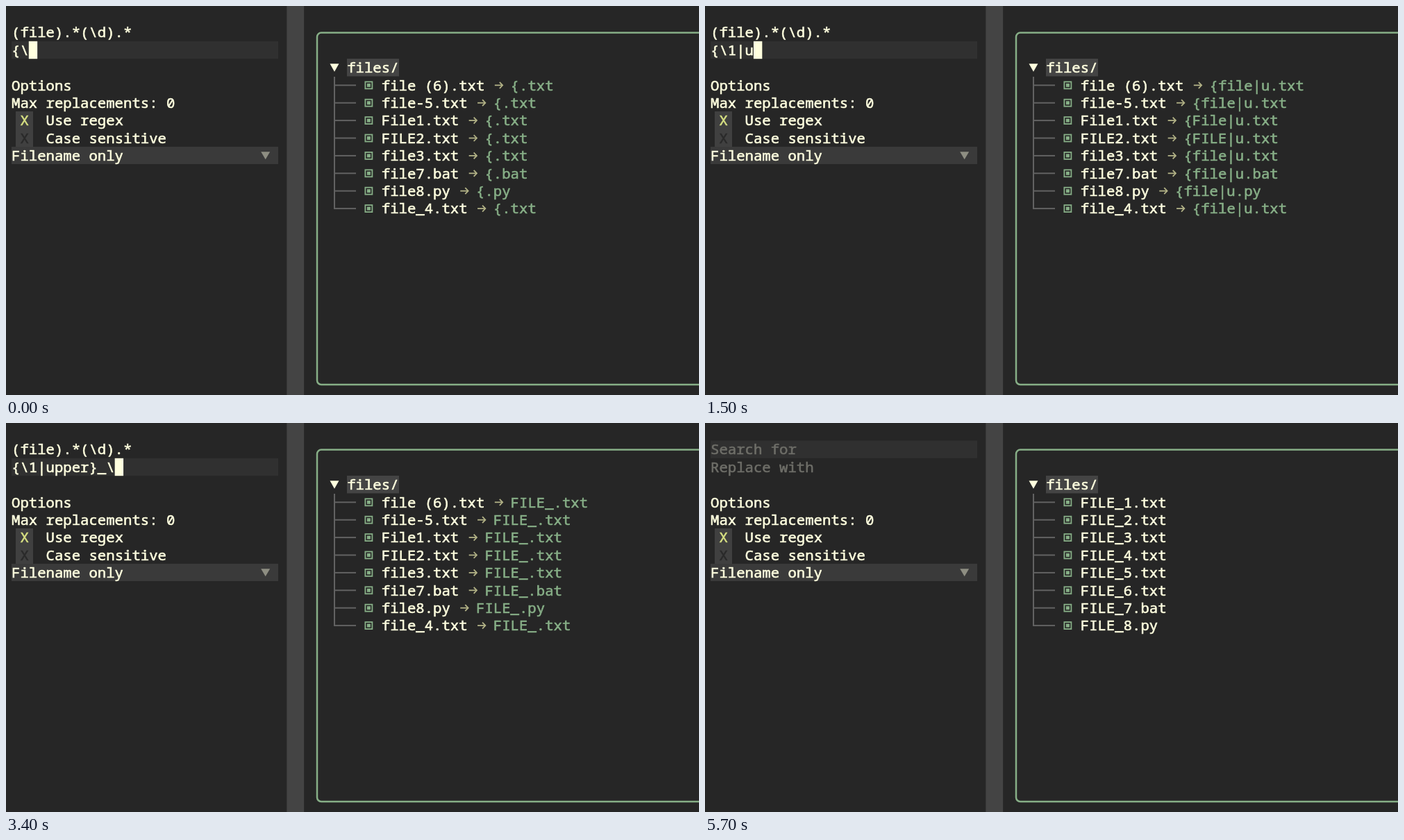
Animation, 998 px wide and 561 px high, one loop 5900 ms. Source, as an HTML page with a canvas:

```html
<!DOCTYPE html>
<html lang="en">
<head>
<meta charset="utf-8">
<title>Batch rename</title>
<style>
  html, body { margin: 0; width: 100%; height: 100%; overflow: hidden; background: #262626; }
  canvas { display: block; }
</style>
</head>
<body>
<canvas id="stage" width="998" height="561"></canvas>
<script>
const ctx = document.getElementById('stage').getContext('2d');
const LOOP = 5900, CELL = 12.39, ROW = 25.4, LEFT = 8;
const BG = '#262626', CREAM = '#ffffdf', GREEN = '#87af87', GRAY = '#444444',
      DIM = '#6e6e68', LINE = '#626262', ARROW = '#b2b286';

const files = ['file (6).txt', 'file-5.txt', 'File1.txt', 'FILE2.txt',
               'file3.txt', 'file7.bat', 'file8.py', 'file_4.txt'];
const template = '{\\1|upper}_\\2';
// [time, characters typed]
const keys = [[0, 2], [100, 3], [700, 4], [1500, 5], [1600, 7], [1700, 8], [1800, 9],
              [3400, 12], [4100, 13]];

const colX = c => LEFT + c * CELL;
const rowY = r => ROW * (r + 0.5);

function box(x, y, w, h, color) {
  ctx.fillStyle = color;
  ctx.fillRect(x, y, w, h);
}

// A thin outline gives the letters their medium weight.
function text(s, col, row, color = CREAM) {
  const x = colX(col), y = Math.round(rowY(row) + 7.3);
  ctx.fillStyle = ctx.strokeStyle = color;
  ctx.lineWidth = 0.6;
  ctx.fillText(s, x, y);
  ctx.strokeText(s, x, y);
}

function stroke(points, color, width = 2) {
  ctx.strokeStyle = color;
  ctx.lineWidth = width;
  ctx.beginPath();
  for (const [x, y] of points) ctx.lineTo(x, y);
  ctx.stroke();
}

function triangle(x, y, w, h, color) {
  ctx.fillStyle = color;
  ctx.beginPath();
  ctx.moveTo(x - w / 2, y - h / 2);
  ctx.lineTo(x + w / 2, y - h / 2);
  ctx.lineTo(x, y + h / 2);
  ctx.fill();
}

function rename(name, typed) {
  const [stem, ext] = name.split('.');
  return typed.replace(/[\\|]$/, '')
    .replace('\\1', stem.slice(0, 4))
    .replace('\\2', stem.match(/\d/)[0])
    .replace(/\{(\w+)\|upper\}/, (_, word) => word.toUpperCase()) + '.' + ext;
}

function frame() {
  box(0, 0, 998, 561, BG);
  box(404.4, 0, 24.8, 561, GRAY);
  ctx.strokeStyle = GREEN;
  ctx.lineWidth = 2.5;
  ctx.beginPath();
  ctx.roundRect(448, 38.6, 600, 507.4, 6);
  ctx.stroke();
}

function options() {
  text('Options', 0, 4);
  text('Max replacements: 0', 0, 5);
  box(14, 152, 25, 51, '#404040');
  text('X', 1, 6, '#d7e082');
  text('X', 1, 7, '#2a2a2a');
  text('Use regex', 4, 6);
  text('Case sensitive', 4, 7);
  box(LEFT, 203, 384, 25, '#3a3a3a');
  text('Filename only', 0, 8);
  triangle(373.7, 215.7, 13, 11, '#8e8e82');
}

function inputs(typed, cursor, done) {
  box(LEFT, done ? 25.4 : 50.8, 384, 25.4, '#303030');
  text(done ? 'Search for' : '(file).*(\\d).*', 0, 1, done ? DIM : CREAM);
  text(done ? 'Replace with' : typed, 0, 2, done ? DIM : CREAM);
  if (cursor) box(colX(typed.length), 50.8, CELL, 25.4, CREAM);
}

function arrow(x, y) {
  stroke([[x + 2, y], [x + 13, y]], ARROW, 1.8);
  stroke([[x + 9, y - 4.5], [x + 13.3, y], [x + 9, y + 4.5]], ARROW, 1.8);
}

function tree(names, typed) {
  box(491, 76, 75, 25.4, GRAY);
  triangle(473, 89, 13, 11.5, CREAM);
  text('files/', 39, 3);
  if (!names.length) return;
  stroke([[473, 102], [473, rowY(11) + 1]], LINE);
  names.forEach((name, i) => {
    const row = i + 4, y = rowY(row);
    stroke([[473, y], [504, y]], LINE);
    ctx.strokeStyle = GREEN;
    ctx.lineWidth = 1.8;
    ctx.strokeRect(517.4, y - 5, 10, 10);
    box(519.9, y - 2.5, 5, 5, GREEN);
    text(name, 43, row);
    if (!typed) return;
    const col = 44 + name.length;
    arrow(colX(col), y);
    text(rename(name, typed), col + 2, row, GREEN);
  });
}

function draw(now) {
  const t = now % LOOP;
  const done = t >= 5700;
  const typed = template.slice(0, keys.filter(k => k[0] <= t).pop()[1]);
  const cursor = t < 2300 || (t >= 3400 && t < 4600);
  const loading = t >= 4100 && t < 4400;
  const names = loading ? [] : done ? files.map(f => rename(f, template)).sort() : files;

  ctx.font = '500 20.65px "Noto Sans Mono", monospace';
  ctx.lineJoin = 'miter';
  frame();
  inputs(typed, cursor, done);
  options();
  tree(names, done ? '' : typed);
  requestAnimationFrame(() => draw(performance.now()));
}
draw(0);
</script>
</body>
</html>
```
